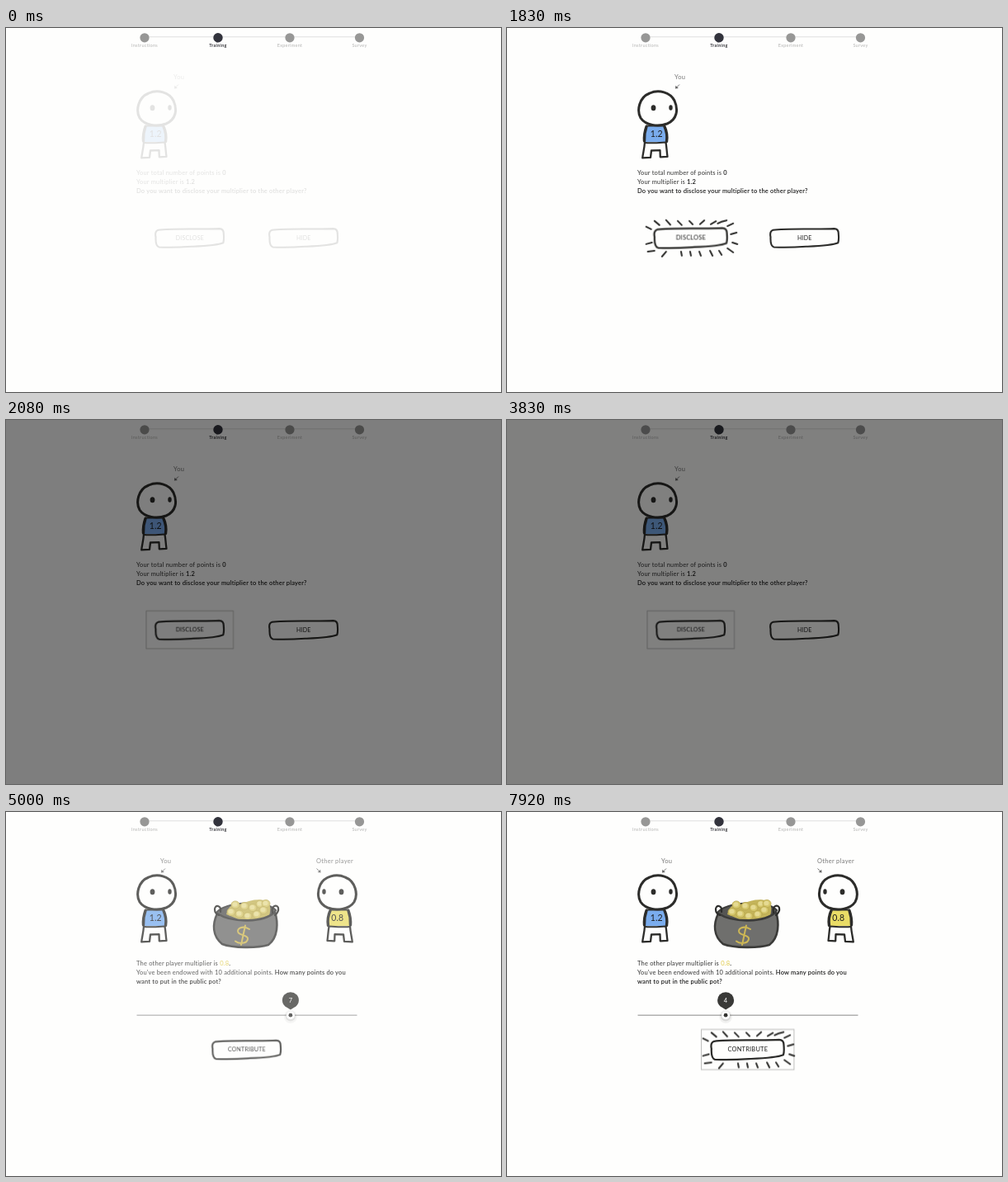
Animation of 600 by 441 pixels, one loop 8000 ms. Source, as an HTML page:

```html
<!DOCTYPE html>
<html lang="en">
<head>
<meta charset="utf-8">
<title>Public pot training</title>
<style>
@property --v { syntax: '<number>'; inherits: true; initial-value: 7; }
html, body { margin: 0; width: 100%; height: 100%; overflow: hidden; background: #fefefd; }
svg { display: block; width: 600px; height: 441px; }
text { font: 7.5px Lato, sans-serif; letter-spacing: .18px; fill: #333; }
b, .b { font-weight: 600; fill: #1c1c1c; }
.mid { text-anchor: middle; }
.step { font-size: 5.5px; letter-spacing: .3px; fill: #b4b4b3; }
.step.b { fill: #26262c; }
.name { letter-spacing: .3px; fill: #777; }
.num { font-size: 10.5px; letter-spacing: .2px; fill: #1d1d1d; }
.label { font-size: 7px; letter-spacing: .2px; fill: #1d1d1d; }
.ink { fill: none; stroke: #2c2c2a; stroke-linecap: round; stroke-linejoin: round; }

.first, .fade, .second, .dim, .btn, .rays, .box, .slider { animation: 8s linear infinite; }
.first { animation-name: first; animation-timing-function: step-end; }
.fade { animation-name: fade; animation-delay: -.24s; }
.second { animation-name: second; }
.dim { animation-name: dim; }
.one .btn { animation-name: grow1; }
.one .rays { animation-name: rays1; animation-timing-function: step-end; }
.one .box { animation-name: box1; animation-timing-function: step-end; }
.two .btn { animation-name: grow2; }
.two .rays { animation-name: rays2; animation-timing-function: step-end; }
.two .box { animation-name: box2; animation-timing-function: step-end; }
.slider { animation-name: drag; animation-timing-function: step-end; }
.knob { transform: translateX(calc(var(--v) * 26.6px)); }
.digits { transform: translateY(calc(var(--v) * -24px)); }

@keyframes first { 0% { opacity: 1 } 50.9375%, 100% { opacity: 0 } }
@keyframes fade { 0% { opacity: 0; animation-timing-function: ease } 25%, 100% { opacity: 1 } }
@keyframes second {
  0% { opacity: 0 }
  50.9375% { opacity: 0; animation-timing-function: ease }
  75.9375%, 100% { opacity: 1 }
}
@keyframes dim {
  0% { opacity: 0 }
  22.875% { opacity: 0; animation-timing-function: ease-in-out }
  25.875% { opacity: .5 }
  47.75% { opacity: .5; animation-timing-function: ease-in-out }
  50.75%, 100% { opacity: 0 }
}
@keyframes grow1 {
  0% { transform: scale(1) }
  8% { transform: scale(1); animation-timing-function: ease }
  10.5% { transform: scale(1.065) }
  23.5% { transform: scale(1.065); animation-timing-function: ease }
  26%, 100% { transform: scale(1) }
}
@keyframes rays1 { 0% { opacity: 0 } 8% { opacity: 1 } 23.125%, 100% { opacity: 0 } }
@keyframes box1 { 0% { opacity: 0 } 23.125%, 100% { opacity: 1 } }
@keyframes grow2 {
  0% { transform: scale(1) }
  96.5% { transform: scale(1); animation-timing-function: ease }
  98.9%, 100% { transform: scale(1.065) }
}
@keyframes rays2 { 0% { opacity: 0 } 96.5%, 100% { opacity: 1 } }
@keyframes box2 { 0% { opacity: 0 } 98.75%, 100% { opacity: 1 } }
@keyframes drag {
  0% { --v: 7 }
  72.875% { --v: 6 }
  77.875% { --v: 5 }
  78.875% { --v: 4 }
  81.125% { --v: 3 }
  85.25%, 100% { --v: 4 }
}
</style>
</head>
<body>
<svg viewBox="0 0 600 441">
  <defs>
    <g id="person">
      <path d="M168.500 119H191.500L193.500 138H167Z" fill="currentColor"/>
      <path class="ink" stroke-width="3" d="M173 79C184 74 198 78 203 88C208 99 206 111 194 116C183 120 168 118 162 109C157 100 160 84 173 79Z"/>
      <path class="ink" stroke-width="3.400" d="M169 119.500C167 125 166 130 166.500 137M191 119.500C193.500 125 194.500 131 193.500 137.500"/>
      <path class="ink" stroke-width="2" d="M169 118.500H191M167 139C176 140 185 139 193 138.500"/>
      <path class="ink" stroke-width="2.300" d="M167 138.500C166.500 146 165 151 164.200 157.300L174 156.800L175 148.500L185.500 148.200L185.800 156.300L194.500 155.800C193.500 149 193.500 144 192.500 139"/>
      <ellipse cx="177.500" cy="96.800" rx="2.900" ry="3.500" fill="#2c2c2a"/>
      <ellipse cx="198.500" cy="96.500" rx="2.200" ry="3.300" fill="#2c2c2a"/>
    </g>
    <path id="frame" class="ink" stroke-width="2.100" d="M-38-9.500C-20-12 15-10 36-11.200Q41.500-11 41.300-5Q42 2 40.800 6C33 9.500 15 10 2 10.500Q-20 12-37 11.200Q-41.500 10-41-1Q-42.500-8-38-9.500Z"/>
    <path id="rays" class="ink" stroke-width="1.900" d="M-41-19.300l5.600 4.700M-27.800-20.300l4.800 5.300M-14.600-19.300l4.600 4.700M-1.400-19.300l3.800 3.800M10.800-15.600l4.800-4.400M23-15.600l6-3.400M31-16.500Q35-19 41-20M42-13.500l6.500-3M45.800-4.200l6.600-1.900M47.600 5.200l5.700 1.900M42 11.800l6.600 4.700M32.500 14.600l2.900 4.700M22.200 14.600l2.800 5.700M10 15.600l1.800 4.700M-.5 15.600l1 4.700M-10.800 15.600l.9 4.700M-32.500 21.200l4.700-5.600M-48.600 15.600l7.600-1M-50.500 7l6.600-1.800M-50.500-12.700l5.700 2.800"/>
    <rect id="box" x="-52.500" y="-23" width="105.500" height="45.800" fill="none" stroke="#b9b9b8" stroke-width=".9"/>
    <g id="arrow">
      <path d="M2.500-2.500L-1.500 1.500" stroke="#666" stroke-width=".9"/>
      <path d="M-2.600 2.600L-2.100-1.300L1.300 2.100Z" fill="#666"/>
    </g>
    <g id="coin">
      <ellipse rx="5" ry="4.600" fill="#d5c76c" stroke="#b9a84e" stroke-width=".8"/>
      <ellipse cx="-.5" cy="-.6" rx="3" ry="2.700" fill="#e5da92"/>
    </g>
    <clipPath id="bubble"><circle cy="228" r="9.500"/></clipPath>
  </defs>

  <path d="M168 10.800H428" stroke="#dfdfde"/>
  <g fill="#979796">
    <circle cx="168" cy="11.800" r="5.600"/>
    <circle cx="257" cy="11.800" r="5.700" fill="#32333c"/>
    <circle cx="344" cy="11.800" r="5.600"/>
    <circle cx="428.500" cy="11.800" r="5.600"/>
  </g>
  <g class="mid">
    <text class="step" x="168" y="22.600">Instructions</text>
    <text class="step b" x="257" y="22.600">Training</text>
    <text class="step" x="344" y="22.600">Experiment</text>
    <text class="step" x="428.500" y="22.600">Survey</text>
  </g>

  <g class="first"><g class="fade">
    <text class="name" x="203" y="62.200">You</text>
    <use href="#arrow" x="206.500" y="71"/>
    <use href="#person" color="#7aaced"/>
    <text class="num mid" x="181.300" y="131.800">1.2</text>
    <text x="158" y="177.600">Your total number of points is <tspan class="b">0</tspan></text>
    <text x="158" y="188.600">Your multiplier is <tspan class="b">1.2</tspan></text>
    <text class="b" x="158" y="199.500">Do you want to disclose your multiplier to the other player?</text>
    <g class="one" transform="translate(222.500 254.300)"><g class="btn">
      <use class="box" href="#box"/>
      <use class="rays" href="#rays"/>
      <use href="#frame"/>
      <text class="label mid" x=".3" y="2.300">DISCLOSE</text>
    </g></g>
    <g transform="translate(360.500 254.300)">
      <use href="#frame"/>
      <text class="label mid" x=".3" y="2.300">HIDE</text>
    </g>
  </g></g>

  <g class="second">
    <text class="name" x="187" y="62.200">You</text>
    <use href="#arrow" x="190.500" y="71"/>
    <text class="name" x="376" y="62.200">Other player</text>
    <use href="#arrow" transform="translate(379 71) scale(-1 1)"/>
    <use href="#person" color="#7aaced"/>
    <use href="#person" color="#e9dc66" transform="translate(584) scale(-1 1)"/>
    <text class="num mid" x="181.300" y="131.800">1.2</text>
    <text class="num mid" x="401.800" y="131.800">0.8</text>

    <path d="M255 122C263 109 315 105 327 119L318 132H266Z" fill="#555553" stroke="#3b3b39" stroke-width="2"/>
    <path d="M267 124Q271 109 284 112Q302 103 318 108Q322 116 319 126L292 134Z" fill="#c4b45a"/>
    <use href="#coin" x="278" y="112.500"/>
    <use href="#coin" x="308" y="111.500"/>
    <use href="#coin" x="315" y="111"/>
    <use href="#coin" x="289" y="114"/>
    <use href="#coin" x="299" y="116"/>
    <use href="#coin" x="312" y="119"/>
    <use href="#coin" x="273" y="121"/>
    <use href="#coin" x="304" y="124"/>
    <use href="#coin" x="283" y="123.500"/>
    <use href="#coin" x="293" y="126"/>
    <path d="M256 123C250 136 250 150 262 160C275 165 305 165 318 161C330 152 330 134 326 121C313 134 275 135 256 123Z" fill="#6f6f6d" stroke="#3b3b39" stroke-width="2.600" stroke-linejoin="round"/>
    <path class="ink" stroke-width="2.200" d="M258 125C251 122 252 113 257 114Q261 115 260 121M323 122C321 114 328 111 330 116Q331 121 326 125"/>
    <path d="M295 142C287 137 279 141 281.500 146C284 150 294 149 293 154C292 160 282 160 278 156.500M290 137.500L285 161" fill="none" stroke="#cdb755" stroke-width="2" stroke-linecap="round"/>

    <text x="158" y="185.600">The other player multiplier is <tspan style="fill:#dfc945">0.8</tspan><tspan class="b">.</tspan></text>
    <text x="158" y="196.600">You've been endowed with 10 additional points. <tspan class="b">How many points do you</tspan></text>
    <text class="b" x="158" y="207.500">want to put in the public pot?</text>

    <path d="M158.500 246.300H425.500" stroke="#b0b0af" stroke-width="1.500"/>
    <g class="slider"><g transform="translate(158.700)"><g class="knob">
      <circle cy="248" r="8" fill="#000" opacity=".05"/>
      <circle cy="247.300" r="6.200" fill="#000" opacity=".1"/>
      <circle cy="246.200" r="5" fill="#fff"/>
      <circle cy="246.200" r="2.400" fill="#333331"/>
      <path d="M0 239.500L-6.500 235.500A10 9.800 0 1 1 6.500 235.500Z" fill="#393937"/>
      <g clip-path="url(#bubble)"><g class="digits mid" style="--fill:#fff">
        <text style="fill:#fff" y="302.800">3</text>
        <text style="fill:#fff" y="326.800">4</text>
        <text style="fill:#fff" y="350.800">5</text>
        <text style="fill:#fff" y="374.800">6</text>
        <text style="fill:#fff" y="398.800">7</text>
      </g></g>
    </g></g></g>

    <g class="two" transform="translate(291.500 287.900)"><g class="btn">
      <use class="box" href="#box"/>
      <use class="rays" href="#rays"/>
      <use href="#frame"/>
      <text class="label mid" x=".3" y="2.300">CONTRIBUTE</text>
    </g></g>
  </g>

  <rect class="dim" width="600" height="441"/>
</svg>
</body>
</html>
```
